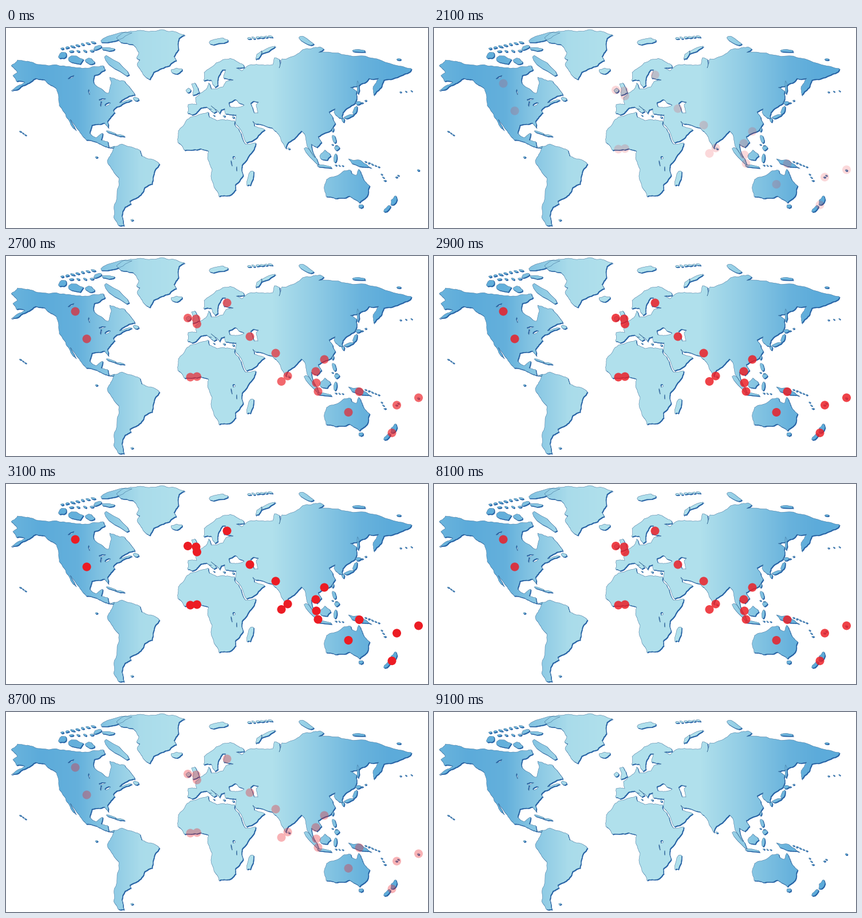
A matplotlib script that plays this animation: 737 by 350 pixels, repeating every 9200 ms.

```python
import numpy as np
import matplotlib.pyplot as plt
from matplotlib.animation import FuncAnimation
from matplotlib.patches import PathPatch
from matplotlib.path import Path
from matplotlib.transforms import Affine2D

W, H, DPI = 737, 350, 64
PT = 72 / DPI
STEP = 100
LOOP = 9200
rng = np.random.default_rng(4)

north_america = [
    (9, 66), (20, 56), (38, 58), (75, 66), (100, 66), (138, 70), (170, 66),
    (173, 73), (154, 83), (153, 96), (174, 113), (179, 114), (184, 96),
    (181, 86), (189, 88), (207, 93), (225, 117), (206, 124), (198, 131),
    (220, 126), (193, 138), (187, 144), (190, 148), (177, 163), (179, 175),
    (172, 166), (150, 170), (146, 184), (157, 192), (169, 184), (166, 196),
    (178, 199), (180, 209), (189, 207), (188, 211), (168, 205), (140, 196),
    (123, 175), (112, 160), (122, 179), (106, 157), (93, 136), (88, 106),
    (68, 91), (52, 88), (36, 98), (9, 110), (33, 95), (18, 93), (12, 83),
    (20, 78)]
south_america = [
    (189, 207), (202, 203), (219, 208), (234, 214), (237, 224), (252, 229),
    (268, 238), (258, 256), (255, 273), (242, 279), (235, 292), (216, 303),
    (218, 308), (208, 313), (202, 329), (206, 346), (196, 345), (188, 331),
    (194, 288), (197, 262), (183, 244), (177, 232), (186, 216)]
greenland = [
    (193, 17), (200, 11), (235, 4), (275, 3), (283, 6), (312, 12), (302, 18),
    (301, 38), (293, 50), (297, 57), (285, 66), (258, 77), (251, 90), (240, 82),
    (229, 64), (234, 56), (228, 53), (232, 43), (222, 29), (200, 25)]
africa = [
    (322, 156), (353, 147), (355, 156), (368, 162), (378, 160), (400, 163),
    (399, 169), (418, 203), (436, 201), (428, 219), (412, 240), (414, 258),
    (400, 275), (401, 283), (390, 293), (372, 295), (358, 260), (360, 248),
    (352, 227), (354, 216), (340, 211), (312, 214), (300, 200), (301, 180),
    (313, 165)]
north_eurasia = [
    (317, 149), (318, 134), (333, 134), (331, 122), (349, 108), (354, 96),
    (359, 107), (379, 103), (384, 94), (397, 91), (380, 88), (384, 73),
    (378, 73), (371, 85), (370, 100), (365, 104), (358, 91), (345, 92),
    (346, 78), (367, 61), (392, 53), (414, 64), (416, 69), (402, 70), (412, 75),
    (428, 64), (466, 64), (469, 52), (478, 55), (477, 70), (482, 54), (490, 54),
    (518, 38), (548, 33), (555, 37), (546, 43), (592, 47), (648, 54), (708, 71),
    (706, 76), (690, 83), (660, 91)]
south_eurasia = [
    (655, 104), (642, 118), (641, 103), (651, 88), (634, 88), (626, 96),
    (601, 104), (612, 110), (609, 132), (588, 148), (587, 159), (581, 157),
    (573, 148), (575, 141), (564, 147), (575, 167), (566, 180), (545, 190),
    (551, 200), (543, 209), (533, 203), (540, 227), (528, 210), (521, 185),
    (516, 180), (493, 200), (489, 211), (477, 188), (465, 175), (437, 168),
    (431, 163), (434, 172), (452, 178), (438, 192), (420, 201), (402, 169),
    (402, 152), (383, 150), (382, 141), (376, 143), (373, 150), (358, 136),
    (368, 146), (363, 149), (350, 138), (340, 140), (332, 149), (325, 152)]
australia = [
    (557, 273), (560, 265), (577, 259), (590, 250), (602, 249), (604, 255),
    (612, 258), (616, 247), (623, 262), (635, 276), (630, 295), (617, 306),
    (600, 294), (574, 298), (559, 295)]
britain = [(324, 98), (330, 96), (338, 113), (326, 118), (328, 108)]
new_guinea = [(598, 229), (620, 232), (638, 245), (622, 243), (604, 237)]
black_sea = [(389, 131), (400, 125), (416, 135), (410, 138), (391, 138)]
caspian = [(432, 128), (441, 130), (437, 134), (440, 149), (434, 149), (427, 132)]

# x, y, half width, half height, tilt in degrees
northern_isles = [
    (99, 48, 7, 5, -20), (122, 56, 15, 6, 8), (147, 59, 8, 5, 20),
    (160, 34, 8, 3, -20), (180, 37, 11, 3, 5), (190, 16, 27, 6, -14),
    (193, 66, 25, 7, 36), (298, 75, 10, 5, -5), (319, 109, 4, 4, 0),
    (371, 23, 16, 5, -8), (441, 48, 9, 3, -55), (457, 38, 13, 3, -25),
    (523, 22, 16, 5, 32), (615, 40, 13, 2.5, 3), (686, 55, 4, 1.3, 0),
    (615, 103, 2, 11, 0), (227, 124, 6, 3, 20)]
southern_isles = [
    (615, 131, 5, 3, 0), (610, 144, 3, 8, 20), (598, 155, 8, 2.5, -20),
    (589, 161, 2, 3.5, 0), (571, 178, 1.4, 3.5, 15), (573, 194, 3, 7, -20),
    (578, 210, 4, 4, 0), (533, 223, 19, 4, 51), (555, 242, 14, 2, 8),
    (557, 224, 9, 9, -30), (575, 228, 2.5, 8, 10), (620, 312, 4, 3, 0),
    (677, 303, 4, 9, 25), (666, 316, 8, 3, -50), (427, 263, 5, 14, 14),
    (183, 183, 10, 1.4, 18), (199, 188, 8, 1.5, 8)]
lakes = [
    (168, 125, 6, 1.6, -10), (166, 133, 1.3, 5, 10), (178, 133, 5, 2, -25),
    (145, 112, 1.2, 4.5, -15), (114, 86, 6, 1.5, -25), (398, 227, 2.6, 2.4, 0),
    (394, 237, .9, 4.5, -12), (403, 247, .8, 4.5, -5)]
# first islet, last islet, count
chains = [
    (98, 36, 152, 25, 7), (114, 41, 150, 40, 4), (425, 18, 462, 15, 6),
    (25, 181, 34, 187, 3), (570, 204, 577, 206, 2), (576, 240, 588, 241, 3),
    (628, 234, 651, 243, 5), (656, 256, 662, 267, 3), (682, 261, 685, 258, 2),
    (622, 131, 628, 127, 2), (357, 142, 363, 153, 2), (689, 112, 708, 110, 3)]
specks = [(158, 226), (220, 336), (720, 249), (381, 154), (397, 156), (494, 211)]

markers = [
    (121, 97), (141, 145), (386, 82), (317.5, 108.5), (332, 110), (333.5, 119),
    (426, 141), (471, 170), (322, 212), (333.5, 211), (481, 219.5), (492, 210),
    (556, 181), (541, 202), (542, 222), (545, 237), (617, 237.5), (598, 273.5),
    (682.5, 261), (720.5, 248), (674, 309.5)]


def blob(x, y, rx, ry, tilt=0):
    a = np.linspace(0, 2 * np.pi, 13)[:-1]
    r = rng.uniform(.75, 1.2, 12)
    px, py = rx * r * np.cos(a), ry * r * np.sin(a)
    c, s = np.cos(np.radians(tilt)), np.sin(np.radians(tilt))
    return np.column_stack([x + c * px - s * py, y + s * px + c * py])


def chain(x0, y0, x1, y1, n):
    size = 3.2 if y0 < 50 < x0 else 1.6
    return [blob(x, y, size * rng.uniform(.8, 1.3), size * .5, rng.uniform(-25, 25))
            for x, y in zip(np.linspace(x0, x1, n), np.linspace(y0, y1, n))]


def rough(pts, amount=.09):
    """Add small bays and capes between the given coast points."""
    pts = np.array(pts, float)
    for _ in range(3):
        edge = np.roll(pts, -1, axis=0) - pts
        normal = np.column_stack([-edge[:, 1], edge[:, 0]])
        shift = normal * rng.uniform(-amount, amount, (len(pts), 1))
        mid = pts + edge / 2 + np.clip(shift, -1.8, 1.8)
        pts = np.stack([pts, mid], axis=1).reshape(-1, 2)
    return pts


def ring(pts, hole=False):
    """Closed path, wound one way for land and the other for water."""
    x, y = pts.T
    area = np.sum(x * np.roll(y, -1) - np.roll(x, -1) * y)
    if (area < 0) != hole:
        pts = pts[::-1]
    return Path(np.vstack([pts, pts[:1]]), closed=True)


coasts = [north_america, south_america, greenland, africa,
          north_eurasia + south_eurasia, australia, britain, new_guinea]
rings = [ring(rough(c)) for c in coasts]
rings += [ring(blob(*b)) for b in northern_isles + southern_isles]
rings += [ring(b) for c in chains for b in chain(*c)]
rings += [ring(blob(x, y, 2, 1.3)) for x, y in specks]
rings += [ring(rough(c), True) for c in (black_sea, caspian)]
rings += [ring(blob(*b), True) for b in lakes]
land = Path.make_compound_path(*rings)

fig = plt.figure(figsize=(W / DPI, H / DPI), dpi=DPI, facecolor="white")
ax = fig.add_axes([0, 0, 1, 1])
ax.axis("off")

shadow = Affine2D().translate(1.2, 1.3)
ax.add_patch(PathPatch(land.transformed(shadow), fc="#1a5ba6", ec="#1a5ba6", lw=.4 * PT))

stops = [0, 60, 125, 165, 235, 300, 465, 540, 620, 670, W]
depth = [.8, 1, .9, .55, .08, 0, 0, .38, .85, 1, 1]
t = np.interp(np.arange(W), stops, depth)[None, :, None]
light, deep = np.array([176, 224, 236]) / 255, np.array([92, 171, 218]) / 255
sheet = ax.imshow(light + (deep - light) * t, extent=(0, W, H, 0), aspect="auto", zorder=2)
sheet.set_clip_path(land, ax.transData)
ax.add_patch(PathPatch(land, fc="none", ec="#3f7099", lw=.5 * PT, zorder=3))

dots = PathPatch(Path.make_compound_path(*[Path.circle(m, 7.5) for m in markers]),
                 fc="#ec1c24", ec="none", alpha=0, zorder=4)
ax.add_patch(dots)
ax.set_xlim(0, W)
ax.set_ylim(H, 0)


def draw(i):
    ms = i * STEP
    fade_in = (ms - 1900) // 200
    fade_out = (9100 - ms + 199) // 200
    dots.set_alpha(max(0, min(fade_in, fade_out, 6)) / 6)
    return [dots]


anim = FuncAnimation(fig, draw, frames=LOOP // STEP, interval=STEP,
                     repeat=True, repeat_delay=0, blit=False)
plt.show()
```
